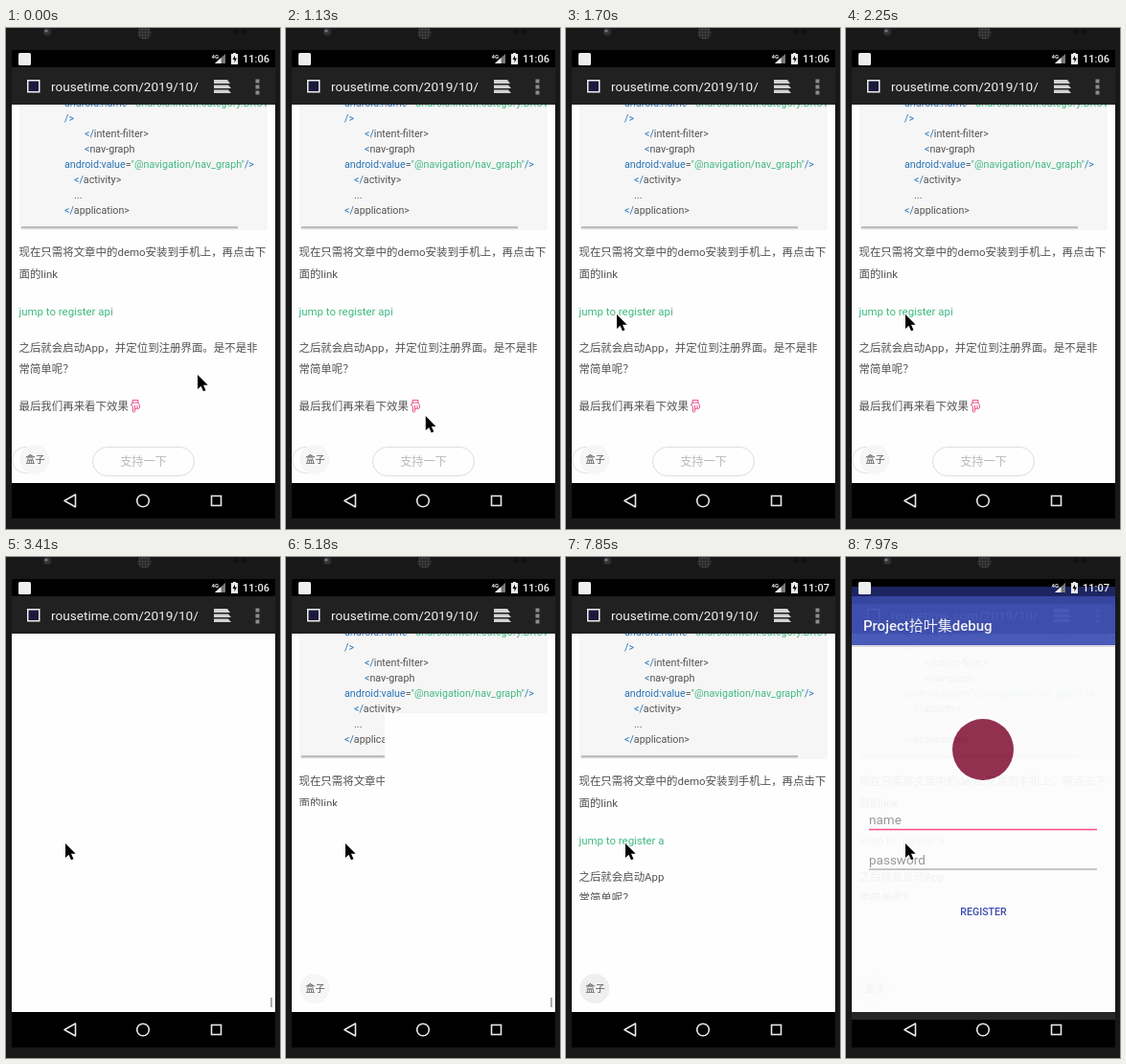
Write an HTML page that moves like this. It is 286 px wide and 523 px high and loops after 8 s.

```html
<!DOCTYPE html>
<html lang="zh-CN">
<head>
<meta charset="utf-8">
<style>
  html, body { margin: 0; height: 100%; overflow: hidden; background: #181818; }
  svg { display: block; width: 286px; height: 523px; }
  text { font-family: Roboto, "Noto Sans CJK SC", sans-serif; white-space: pre; }
  .code { font-size: 10.7px; fill: #525252; }
  .tag { fill: #2973b7; }
  .value { fill: #42b983; }
  .body { font-size: 11.45px; fill: #525252; }
  .field { font-size: 13.5px; fill: #929292; }
</style>
</head>
<body>
<svg viewBox="0 0 286 523">
  <defs>
    <clipPath id="tiles"><path id="tilePath"/></clipPath>
    <clipPath id="codeBox"><path d="M14 80H272V211H14z"/></clipPath>
    <pattern id="mesh" width="3" height="3" patternUnits="userSpaceOnUse">
      <rect width="3" height="3" fill="#262626"/><circle cx="1.5" cy="1.5" r=".9" fill="#4c4c4c"/>
    </pattern>
  </defs>

  <!-- phone body -->
  <rect width="286" height="523" fill="#181818"/>
  <circle cx="43" cy="4" r="4" fill="#303036"/><circle cx="42" cy="3" r="1.6" fill="#777a88"/>
  <circle cx="144.500" cy="5" r="7" fill="url(#mesh)"/>
  <circle cx="240" cy="4" r="2.500" fill="#101010"/><circle cx="249" cy="4" r="2.500" fill="#101010"/>
  <path d="M6 23H281V512H6z"/>

  <!-- browser -->
  <path d="M6 41H281V80H6z" fill="#212121"/>
  <rect id="favicon" x="22.750" y="54.750" width="12" height="12" stroke="#eee" stroke-width="1.500"/>
  <text x="47" y="66" font-size="13.6" fill="#eee">rousetime.com/2019/10/</text>
  <path d="M217 54H231L234 58H217zM217 59.500H232L235 63H217zM217 64.500H232L235 68H217z" fill="#d2d2d2"/>
  <path d="M260.500 53.500h4v4h-4zm0 6h4v4h-4zm0 6h4v4h-4z" fill="#8c8c8c"/>
  <path d="M6 80H281V475H6z" fill="#fefefe"/>

  <g clip-path="url(#tiles)">
    <path d="M14 80H273V209q0 2-2 2H16q-2 0-2-2z" fill="#f6f6f6"/>
    <g class="code" clip-path="url(#codeBox)">
      <text x="61" y="82"><tspan class="tag">android:name</tspan>=<tspan class="value">"android.intent.category.BROWSABLE"</tspan></text>
      <text x="61" y="98" class="tag">/&gt;</text>
      <text x="82" y="114"><tspan class="tag">&lt;/</tspan>intent-filter&gt;</text>
      <text x="82" y="130"><tspan class="tag">&lt;</tspan>nav-graph</text>
      <text x="61" y="146"><tspan class="tag">android:value</tspan>=<tspan class="value">"@navigation/nav_graph"</tspan><tspan class="tag">/&gt;</tspan></text>
      <text x="71" y="162"><tspan class="tag">&lt;/</tspan>activity&gt;</text>
      <text x="71" y="178">...</text>
      <text x="61" y="194"><tspan class="tag">&lt;/</tspan>application&gt;</text>
    </g>
    <path d="M16 207H242V209.500H16z" fill="#bdbdbd"/>
    <g class="body">
      <text x="13.500" y="238">现在只需将文章中的demo安装到手机上，再点击下</text>
      <text x="13.500" y="261">面的link</text>
      <text x="13.500" y="299.500" id="link">jump to register api</text>
      <text x="13.500" y="337.500">之后就会启动App，并定位到注册界面。是不是非</text>
      <text x="13.500" y="360">常简单呢？</text>
      <text x="13.500" y="398.500">最后我们再来看下效果</text>
    </g>
    <path d="M132 388.500h6v3l1.500 2v3q-1 1.500-2.500.5-1 1-2.500 0v3.500q-1 1.500-2 0v-5l-2-1.500q-.5-1.500 1.500-1.500zM134.500 397v-3M137 397v-3M132 391h6" fill="none" stroke="#ec4f8b" stroke-width="1"/>
    <rect x="90.500" y="437.500" width="106" height="30" rx="15" fill="none" stroke="#ddd"/>
    <text x="143.500" y="456.500" font-size="12.2" fill="#bbb" text-anchor="middle">支持一下</text>
    <circle cx="20" cy="451" r="13.500" fill="none" stroke="#ddd"/>
  </g>
  <g id="box">
    <circle id="boxDisc" cx="30" cy="450.500" r="15.500"/>
    <text x="30.500" y="453.500" font-size="10.2" fill="#555" text-anchor="middle">盒子</text>
  </g>
  <path id="scrollMark" d="M276 460H278V470H276z" fill="#aaa"/>

  <!-- register screen sliding in -->
  <g id="register">
    <g opacity=".94">
      <path d="M6 92H281V475H6z" fill="#fcfcfc"/>
      <path d="M6 31H281V41H6z" fill="#1f2868"/>
      <path d="M6 41H281V49H6z" fill="#3848a8"/>
      <path d="M6 49H281V92H6z" fill="#3f51b5"/>
      <path d="M6 92H281V94H6z" fill="#d8d8dc"/>
      <text x="18" y="76.500" font-size="15" font-weight="500" fill="#fff">Project拾叶集debug</text>
      <circle cx="143" cy="201" r="32" fill="#8c2446"/>
      <text x="24" y="278.500" class="field">name</text>
      <path d="M24 283.700H262V285.200H24z" fill="#ff4081"/>
      <text x="24" y="320.500" class="field">password</text>
      <path d="M24 325.500H262V326.500H24z" fill="#8a8a8a"/>
      <text x="143.500" y="374" font-size="10.6" font-weight="500" fill="#3040a8" text-anchor="middle">REGISTER</text>
    </g>
    <path d="M6 475H281V483H6z" fill="#262626"/>
  </g>

  <!-- system bars -->
  <rect x="13" y="26" width="13" height="13" rx="1.500" fill="#eee"/>
  <text x="214.500" y="32" font-size="6" font-weight="700" fill="#eee">4G</text>
  <path d="M229 27V37H218z" fill="#777"/><path d="M224.500 31V37H218z" fill="#eee"/>
  <path d="M237 26h3v1h2v11h-7V27h2z" fill="#eee"/>
  <path d="M239 28.500l-2.500 4.500h2v3l2.500-4.500h-2z"/>
  <text id="clock" x="247" y="36" font-size="11" font-weight="500" fill="#eee"></text>
  <g fill="none" stroke="#e6e6e6" stroke-width="1.600">
    <path d="M72.500 487V500L61 493.500z" stroke-linejoin="round"/>
    <circle cx="143" cy="493.500" r="6.300"/>
    <rect x="214.500" y="488.500" width="10" height="10"/>
  </g>

  <path id="cursor" d="M0 0V15L3.500 11.800 6 17.300 8.500 16.200 6 10.800H10.700z" stroke="#fff" stroke-width="1.200" paint-order="stroke"/>
</svg>
<script>
const LOOP = 8000;
const $ = id => document.getElementById(id);

// time, x, y of the pointer tip
const track = [
  [900, 200, 362], [1000, 178, 383], [1130, 146, 405], [1230, 123, 414],
  [1330, 102, 405], [1450, 81, 372], [1580, 62, 325], [1700, 53, 299],
  [1720, 53, 299], [1790, 52.5, 285], [2020, 52.5, 285], [2120, 56, 291], [2250, 62, 299]
];

// rendered page areas, each appearing at its time
const tiles = [
  [5180, "M6 80H281V163H103V260H6z"],
  [5870, "M103 163H201V260H103z"],
  [6320, "M201 163H281V260H201z"],
  [6830, "M6 260H103V358H6z"]
];

function pointerAt(t) {
  const next = track.findIndex(p => p[0] > t);
  if (next === 0) return track[0].slice(1);
  if (next < 0) return track[track.length - 1].slice(1);
  const [a, b] = [track[next - 1], track[next]];
  const k = (t - a[0]) / (b[0] - a[0]);
  return [1, 2].map(i => a[i] + (b[i] - a[i]) * k);
}

const show = (id, on) => $(id).setAttribute("visibility", on ? "visible" : "hidden");

function draw(t) {
  const pressed = t >= 6830 && t < 7850;
  $("tilePath").setAttribute("d", t < 2870
    ? "M6 80H281V475H6z"
    : tiles.filter(tile => t >= tile[0]).map(tile => tile[1]).join("") || "M0 0");
  show("box", t < 2870 || t >= 5180);
  show("scrollMark", t >= 3410 && t < 6830);
  show("register", t >= 7970);
  $("boxDisc").setAttribute("fill", t >= 6830 ? "#efefef" : "#f6f6f6");
  $("link").setAttribute("fill", pressed ? "#26966c" : "#42b983");
  $("favicon").setAttribute("fill", t >= 2870 && t < 3410 ? "#212121" : "#1c1a3c");
  $("clock").textContent = t < 5360 ? "11:06" : "11:07";
  $("cursor").setAttribute("transform", `translate(${pointerAt(t)})`);
}

const start = performance.now();
function tick() {
  draw((performance.now() - start) % LOOP);
  requestAnimationFrame(tick);
}
tick();
</script>
</body>
</html>
```
